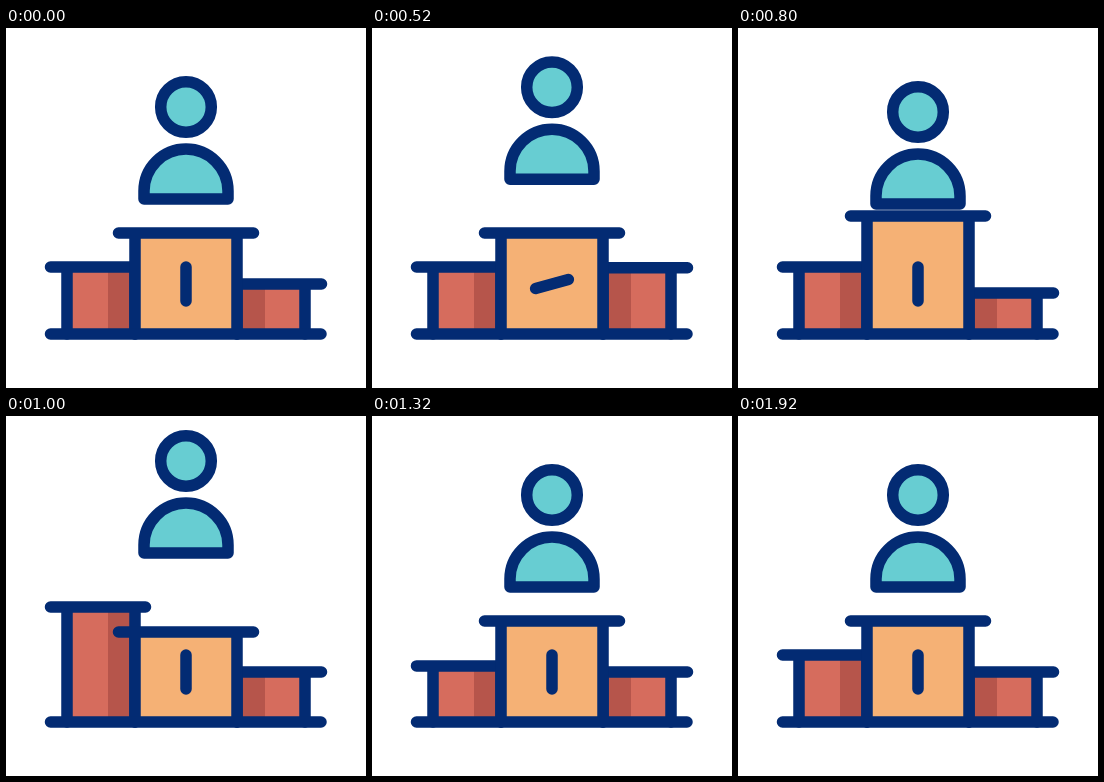
These frames come from a looping animation (360 px wide and 360 px high, 2000 ms). An HTML page:

```html
<!DOCTYPE html>
<html lang="en">
<head>
<meta charset="utf-8">
<title>Podium jump</title>
<style>
  html, body { margin: 0; width: 100%; height: 100%; overflow: hidden; background: #fff; }
  svg { display: block; width: 100vw; height: 100vh; }
  .line { fill: none; stroke: #032b73; stroke-width: 11.5; stroke-linecap: round; stroke-linejoin: round; }
  .teal { fill: #67cdd2; }
  .red { fill: #d66c5d; }
  .dark { fill: #b6554b; }
  .orange { fill: #f5b175; }
</style>
</head>
<body>
<svg viewBox="0 0 360 360">
  <g id="left"></g>
  <g id="right"></g>
  <g id="center"></g>
  <path class="line" d="M44.5 306H315"/>
  <path id="digit" class="line" d="M180 239V273"/>
  <g id="person">
    <circle class="line teal" cx="180" cy="79" r="25.3" style="fill:#67cdd2"/>
    <path class="line teal" d="M138 171V163A42 42 0 0 1 222 163V171Z" style="fill:#67cdd2"/>
  </g>
</svg>
<script>
const LOOP = 2000, STEP = 40, FLOOR = 306;
const $ = id => document.getElementById(id);

const ease = {
  in: t => t * t,
  out: t => t * (2 - t),
  both: t => (1 - Math.cos(Math.PI * t)) / 2
};

// Keys are [time, value, easing towards this key].
const motion = {
  person: [[40, 0], [320, 22], [360, 22], [600, -25, 'out'], [800, 5, 'in'], [1000, -34, 'out'], [1240, 0]],
  right: [[400, 0], [560, -19], [800, 9], [1000, 0]],
  center: [[680, 0], [800, -17], [1000, 11], [1240, 0]],
  left: [[800, 0], [1000, -48], [1310, 11], [1480, 0]],
  digit: [[360, 0], [720, 180]]
};

const blocks = {
  left: { x1: 61, x2: 129, top: 239, bar: [44.5, 139.5], fill: 'red', shade: [102, 129] },
  right: { x1: 231, x2: 299, top: 256, bar: [220.5, 315.5], fill: 'red', shade: [231, 259] },
  center: { x1: 129, x2: 231, top: 205, bar: [112.5, 247.5], fill: 'orange' }
};

function valueAt(keys, time) {
  if (time <= keys[0][0]) return keys[0][1];
  for (let i = 1; i < keys.length; i++) {
    const [t0, v0] = keys[i - 1], [t1, v1, kind = 'both'] = keys[i];
    if (time <= t1) return v0 + (v1 - v0) * ease[kind]((time - t0) / (t1 - t0));
  }
  return keys[keys.length - 1][1];
}

const panel = (x1, x2, y, name) =>
  `<path class="${name}" d="M${x1} ${y}H${x2}V${FLOOR}H${x1}Z"/>`;

function drawBlock(name, time) {
  const b = blocks[name], y = b.top + valueAt(motion[name], time);
  $(name).innerHTML = panel(b.x1, b.x2, y, b.fill)
    + (b.shade ? panel(...b.shade, y, 'dark') : '')
    + `<path class="line" d="M${b.x1} ${FLOOR}V${y}M${b.x2} ${FLOOR}V${y}M${b.bar[0]} ${y}H${b.bar[1]}"/>`;
}

function render(time) {
  Object.keys(blocks).forEach(name => drawBlock(name, time));
  $('person').setAttribute('transform', `translate(0 ${valueAt(motion.person, time)})`);
  $('digit').setAttribute('transform', `rotate(${valueAt(motion.digit, time)} 180 256)`);
}

const start = performance.now();
function tick() {
  const elapsed = (performance.now() - start) % LOOP;
  render(Math.floor(elapsed / STEP) * STEP);
  requestAnimationFrame(tick);
}
tick();
</script>
</body>
</html>
```
